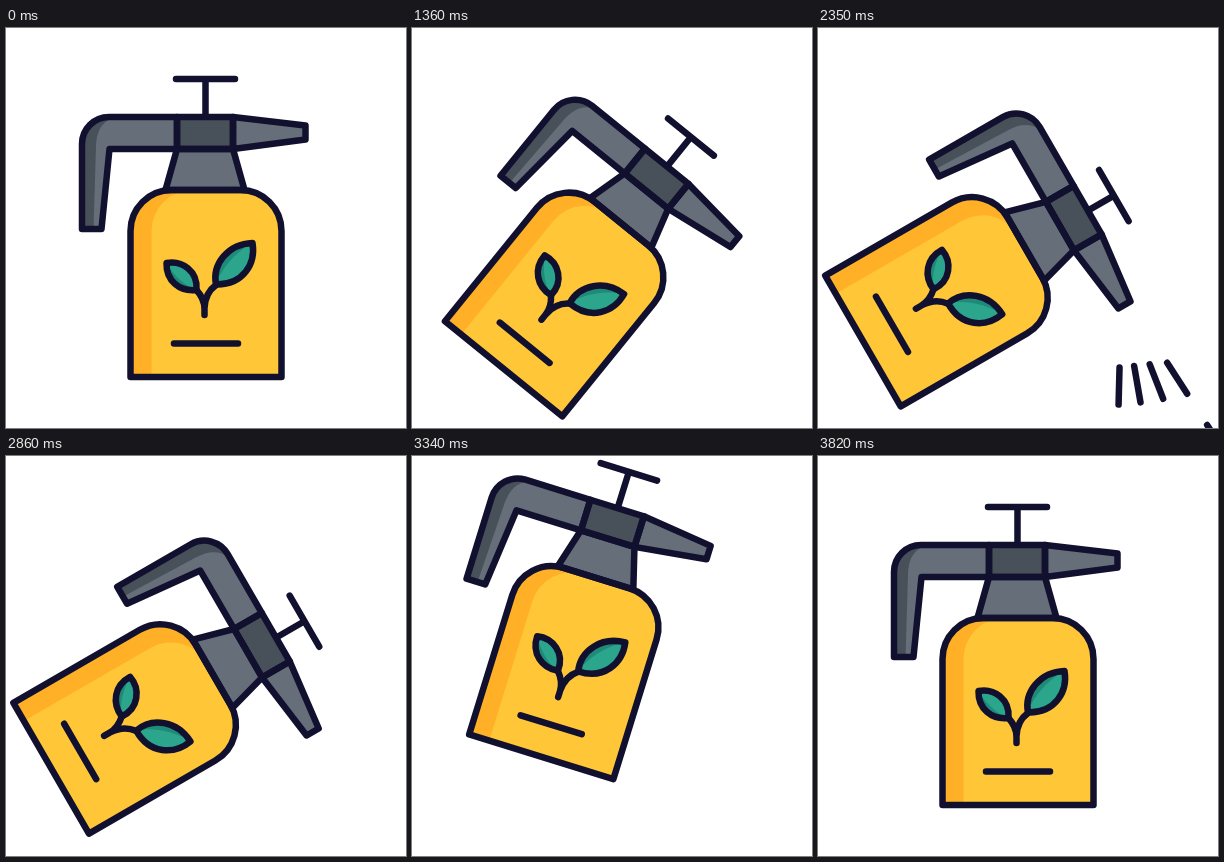
These frames come from a looping animation (400 by 400 pixels, 3.85 s). An HTML page:

```html
<!DOCTYPE html>
<html lang="en">
<head>
<meta charset="utf-8">
<title>Sprayer</title>
<style>
  html, body { margin: 0; width: 100%; height: 100%; overflow: hidden; background: #fff; }
  svg { display: block; width: 100%; height: 100%; }
  .line { fill: none; stroke: #11112f; stroke-width: 6.5; stroke-linecap: round; stroke-linejoin: round; }
  .grey { fill: #666e79; }
  .slate { fill: #485059; }
  .yellow { fill: #ffc637; }
  .orange { fill: #ffb026; }
  .green { fill: #2ca58d; }
  .pine { fill: #1f8a78; }
</style>
</head>
<body>
<svg viewBox="0 0 400 400">
  <defs>
    <path id="handle" d="M171 89H103A27 27 0 0 0 76 116V201H95.500L103.500 121H171Z"/>
    <path id="nozzle" d="M227 89L299.500 97.500V111.500L227 121Z"/>
    <path id="block" d="M171 89H227V121H171Z"/>
    <path id="neck" d="M171 121H227L238.500 162H159.500Z"/>
    <path id="tank" d="M124.500 349V203A41 41 0 0 1 165.500 162H234.500A41 41 0 0 1 275.500 203V349Z"/>
    <path id="leafL" d="M160.500 235C176 232 192 243 190.500 262C174 264 160 253 160.500 235Z"/>
    <path id="leafR" d="M246.500 215C250 236 237 257 210 256.500C206 236 222 216 246.500 215Z"/>
  </defs>
  <g id="spray" class="line"></g>
  <g id="sprayer">
    <path id="plunger" class="line" d="M170 51H229M199.500 51V92"/>
    <use href="#handle" class="grey"/>
    <path class="slate" d="M76 201V116A27 27 0 0 1 103 89H108C95 94 90.500 104 90 118L87.500 201Z"/>
    <use href="#nozzle" class="grey"/>
    <use href="#block" class="slate"/>
    <use href="#neck" class="grey"/>
    <use href="#tank" class="yellow"/>
    <path class="orange" d="M124.500 349V203A41 41 0 0 1 165.500 162H186.500A41 41 0 0 0 145.500 203V349Z"/>
    <use href="#leafL" class="green"/>
    <path class="pine" d="M160.500 235C167 246 177 257 190.500 262C174 264 160 253 160.500 235Z"/>
    <use href="#leafR" class="green"/>
    <path class="pine" d="M210 256.500C215 241 228 225 246.500 215C222 216 206 236 210 256.500Z"/>
    <g class="line">
      <use href="#handle"/><use href="#nozzle"/><use href="#block"/><use href="#neck"/>
      <use href="#tank"/><use href="#leafL"/><use href="#leafR"/>
      <path d="M198.500 287V281C198.500 272 195 267 190.500 262M198.500 280C199 269 203 262 210 257M168 315.500H232"/>
    </g>
  </g>
</svg>
<script>
const LOOP = 3850, STEP = 30, DASH = 37, FLOOR = 402;
const sprayer = document.getElementById('sprayer');
const plunger = document.getElementById('plunger');
const spray = document.getElementById('spray');

const ramp = (t, a, b) => Math.min(1, Math.max(0, (t - a) / (b - a)));
const smooth = (t, a, b) => { const u = ramp(t, a, b); return u * u * (3 - 2 * u); };
const smoother = (t, a, b) => { const u = ramp(t, a, b); return u ** 3 * (10 - 15 * u + 6 * u * u); };

// Offset from rest and angle: tip over, then arc back past upright and settle
function pose(t) {
  const tip = 1 - (1 - ramp(t, 1000, 1780)) ** 1.7;
  const back = smoother(t, 2825, 3760);
  const drop = smooth(t, 2825, 3570);
  const lift = 50.5 * Math.sin(Math.PI * ramp(t, 2825, 3820)) ** 2;
  const sway = 1 - smooth(t, 3670, 3820);
  return {
    x: sway * (-26 * tip + 10.5 * tip * (1 - tip) + 0.278 * lift - 24.7 * back),
    y: 38.5 * tip * (1 - drop) - lift,
    angle: sway * (60 * tip - 72 * back)
  };
}

// A fan of jets that all end at the floor
const jets = Array.from({ length: 4 }, (_, i) => {
  const el = document.createElementNS('http://www.w3.org/2000/svg', 'path');
  el.setAttribute('stroke-dasharray', DASH);
  spray.append(el);
  const a = (91.5 - 11.4 * i) * Math.PI / 180;
  const x = 302.5 + 7 * i, y = 302.5 - 2.6 * i;
  const len = (FLOOR - y) / Math.sin(a);
  return { el, at: k => `${x + Math.cos(a) * len * k} ${y + Math.sin(a) * len * k}` };
});

function draw(t) {
  const { x, y, angle } = pose(t);
  sprayer.setAttribute('transform', `translate(${x} ${y}) rotate(${angle} 200 200)`);
  const press = 8 * (smooth(t, 1540, 1800) - smooth(t, 2780, 2978));
  plunger.setAttribute('transform', `translate(0 ${press})`);
  const head = smooth(t, 1550, 2020), tail = smooth(t, 2060, 2760);
  for (const { el, at } of jets) {
    el.setAttribute('d', head > tail ? `M${at(tail)}L${at(head)}` : '');
  }
}

const start = performance.now();
function tick() {
  const t = (performance.now() - start) % LOOP;
  draw(Math.floor((t - 10) / STEP) * STEP + 10);
  requestAnimationFrame(tick);
}
tick();
</script>
</body>
</html>
```
